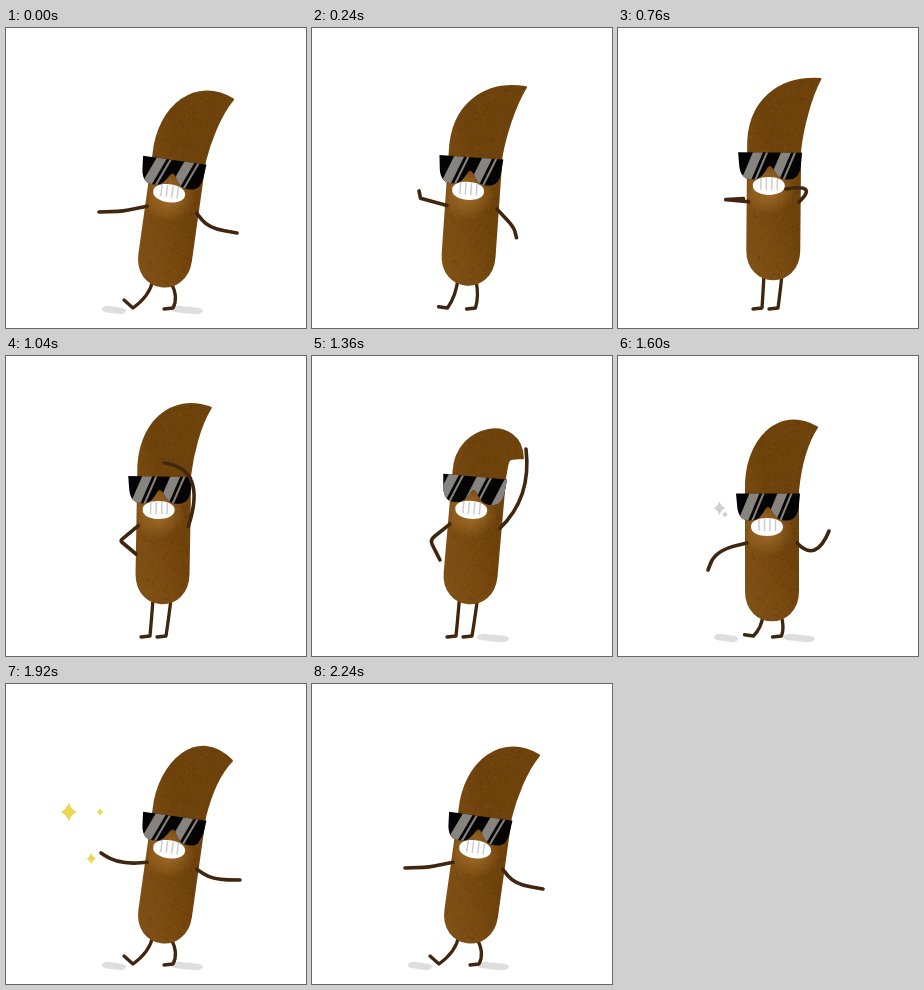
An HTML page with a canvas for the animation above (2.48 s loop, 300 px wide and 300 px high).

```html
<!DOCTYPE html>
<html lang="en">
<head>
<meta charset="utf-8">
<title>Dancing sausage</title>
<style>
html, body { margin: 0; height: 100%; overflow: hidden; background: #fff; }
canvas { display: block; width: 100vw; height: 100vh; }
</style>
</head>
<body>
<canvas id="stage" width="300" height="300"></canvas>
<script>
const ctx = document.getElementById('stage').getContext('2d');
const LOOP = 2480, STEP = 40, LAST = 2240, GROUND = 280;
const INK = '#40260f';

// x, bottom: foot of the body axis; lean in degrees; curl 0..1 bends the tip down;
// step 0..1 spreads the feet; arms: hand x, y, then how far the elbow sticks out and drops
const strut = { x: 155, bottom: 259, lean: 8, curl: .18, step: 1,
  left: [93, 184, 0, 2], right: [231, 205, -8, 5] };
const cool = { x: 154, bottom: 256, lean: 0, curl: 0, step: 0,
  left: [121, 143, 25, -2], right: [178, 215, 22, 2] };
const slick = { x: 156, bottom: 248, lean: 1, curl: .16, step: 0,
  left: [130, 198, 17, 1], right: [158, 107, 31, -26] };
const lean = { x: 156, bottom: 248, lean: 5, curl: 1, step: 0,
  left: [128, 204, 15, -2], right: [214, 93, 19, 9] };
const dip = { x: 154, bottom: 265, lean: 0, curl: .22, step: .5,
  left: [90, 214, 12, -6], right: [211, 175, 3, 26] };
const flick = { ...strut, curl: .28, left: [95, 169, 6, 7], right: [234, 196, -6, 5] };
const POSES = [[0, strut], [480, cool], [1040, slick], [1360, lean],
  [1600, dip], [1920, flick], [2240, strut]];

function mix(a, b, p) {
  if (typeof a === 'number') return a + (b - a) * p;
  if (Array.isArray(a)) return a.map((v, i) => mix(v, b[i], p));
  return Object.fromEntries(Object.keys(a).map(k => [k, mix(a[k], b[k], p)]));
}

function poseAt(t) {
  const i = Math.max(1, POSES.findIndex(([time]) => time >= t));
  const [t0, a] = POSES[i - 1], [t1, b] = POSES[i];
  return mix(a, b, (1 - Math.cos(Math.PI * (t - t0) / (t1 - t0))) / 2);
}

const hop = (t, start, length, height) =>
  t > start && t < start + length ? height * Math.sin(Math.PI * (t - start) / length) ** 2 : 0;

const noise = n => { const v = Math.sin(n * 127.1) * 43758.5; return v - Math.floor(v); };

// a point of the body's own frame on the stage
function place({ x, bottom, lean }, px, py) {
  const a = lean * Math.PI / 180, c = Math.cos(a), s = Math.sin(a);
  return [x + px * c - py * s, bottom + px * s + py * c];
}

function fill(color, d) {
  ctx.fillStyle = color;
  ctx.fill(new Path2D(d));
}

function line(color, width, d) {
  ctx.strokeStyle = color;
  ctx.lineWidth = width;
  ctx.stroke(new Path2D(d));
}

function arm(pose, side, [hx, hy, out, drop]) {
  const shoulder = place(pose, side * 25, -78), hand = [hx, hy];
  const mid = mix(shoulder, hand, .5), elbow = [mid[0] + side * out, mid[1] + drop];
  // an elbow level with the arm's middle is sharp, a dropped one is round
  const round = Math.min(1, Math.abs(drop) / 9);
  line(INK, 3.6, `M${shoulder} L${mix(elbow, shoulder, round)}` +
    ` Q${elbow} ${mix(elbow, hand, round)} L${hand}`);
}

function leg(pose, side) {
  const { step } = pose, [hx, hy] = place(pose, side * 9, -6);
  const ax = 152 - 5 * step + side * (8 + 12 * step);
  const lift = side < 0 ? 9 * step * step : 0;
  line(INK, 3.3, `M${hx},${hy} Q${(hx + ax) / 2 + 7 * step},${(hy + GROUND) / 2 + 2}` +
    ` ${ax},${GROUND} l-9,${1 - lift}`);
}

function drawBody(curl) {
  const path = new Path2D();
  path.moveTo(-26, -130);
  path.bezierCurveTo(-28, -180, 5 + 32 * curl ** 2, -194 - 130 * curl * (1 - curl),
    46 - 4 * curl, -206 + 56 * curl);
  path.bezierCurveTo(36 - 11 * curl, -184 + 36 * curl, 28, -150, 26, -130);
  path.lineTo(26, -30);
  path.bezierCurveTo(26, 9, -26, 9, -26, -30);
  path.closePath();
  const shade = ctx.createLinearGradient(-26, 0, 34, -20);
  shade.addColorStop(0, '#7f5216');
  shade.addColorStop(.5, '#7b4c11');
  shade.addColorStop(1, '#6e420b');
  ctx.fillStyle = ctx.strokeStyle = shade;
  ctx.lineWidth = 2;
  ctx.fill(path);
  ctx.stroke(path);

  ctx.save();
  ctx.clip(path);
  const glow = ctx.createRadialGradient(-6, -92, 4, -6, -92, 28);
  glow.addColorStop(0, '#a06d2a');
  glow.addColorStop(1, '#a06d2a00');
  ctx.fillStyle = glow;
  ctx.fillRect(-40, -130, 80, 80);
  for (let i = 0; i < 900; i++) {
    ctx.fillStyle = i % 2 ? '#4a2a0028' : '#a06a2428';
    ctx.fillRect(noise(i + 1) * 75 - 28, -noise(i + 2000) * 210, 1.7, 1.7);
  }
  ctx.restore();
}

function drawFace(shine) {
  ctx.save();
  ctx.translate(-4, -114.5);
  fill('#fff', 'M-17,20.5 C-18,8.5 16,8.5 15,20.5 C15,32.5 -17,32.5 -17,20.5Z');
  for (let x = -9; x < 9; x += 5.5) line('#cbc8c8', 1.4, `M${x},13 v11`);
  const lenses = new Path2D('M-32,-13 H32 L31,-2 C30,12 24,14 17,14 C10,14 7,10 3,3' +
    ' Q0,-2 -3,3 C-7,10 -10,14 -17,14 C-24,14 -30,12 -31,-2Z');
  ctx.fillStyle = '#050404';
  ctx.fill(lenses);
  ctx.clip(lenses);
  const streak = (x, w) => fill('#87837f', `M${x + 6},-14 h${w} l-12,29 h${-w}Z`);
  for (let x = shine; x < 40; x += 28) {
    streak(x - 5, 10);
    streak(x + 8, 2.2);
  }
  ctx.restore();
}

function dust(x, width) {
  ctx.fillStyle = '#dedede';
  ctx.beginPath();
  for (let i = -1; i <= 1; i++) {
    const cx = x + i * width * .25, cy = 282 + i * .8;
    ctx.moveTo(cx, cy);
    ctx.ellipse(cx, cy, width * .25, 3.4, 0, 0, 2 * Math.PI);
  }
  ctx.fill();
}

// flies from beside the arm to x, y
function spark(t, start, x, y, size) {
  const p = (t - start) / 520;
  if (p <= 0 || p >= 1) return;
  const [cx, cy] = mix([109, 157], [x, y], 1 - (1 - p) ** 2);
  const s = size * Math.sin(Math.PI * p) ** .25, n = s * .24;
  let d = `M${cx},${cy - s}`;
  for (const [ix, iy, ox, oy] of [[1, -1, .85, 0], [1, 1, 0, 1], [-1, 1, -.85, 0], [-1, -1, 0, -1]])
    d += ` Q${cx + ix * n},${cy + iy * n} ${cx + ox * s},${cy + oy * s}`;
  fill(t < 1680 ? '#cfcfcf' : '#e9d750', d);
}

function draw(t) {
  const pose = poseAt(t);
  const stretch = 1 + hop(t, 200, 280, .025) + hop(t, 1600, 320, .06);
  ctx.fillStyle = '#fff';
  ctx.fillRect(0, 0, 300, 300);
  ctx.lineCap = ctx.lineJoin = 'round';
  if (t < 160 || t >= 1560) dust(108, 24);
  if (t < 160 || t >= 1320) dust(181, 32);

  ctx.save();
  ctx.translate(0, GROUND * (1 - stretch));
  ctx.scale(1, stretch);
  leg(pose, -1);
  leg(pose, 1);
  ctx.save();
  ctx.translate(pose.x, pose.bottom);
  ctx.rotate(pose.lean * Math.PI / 180);
  drawBody(pose.curl);
  drawFace(-17 - 10 * pose.curl);
  ctx.restore();
  arm(pose, -1, pose.left);
  arm(pose, 1, pose.right);
  ctx.restore();

  spark(t, 1560, 58, 125, 10);
  spark(t, 1580, 82, 177, 6);
  spark(t, 1640, 90, 120, 4);
}

const begin = performance.now();
function tick() {
  const t = (performance.now() - begin) % LOOP;
  draw(Math.min(Math.floor(t / STEP) * STEP, LAST));
  requestAnimationFrame(tick);
}
tick();
</script>
</body>
</html>
```
